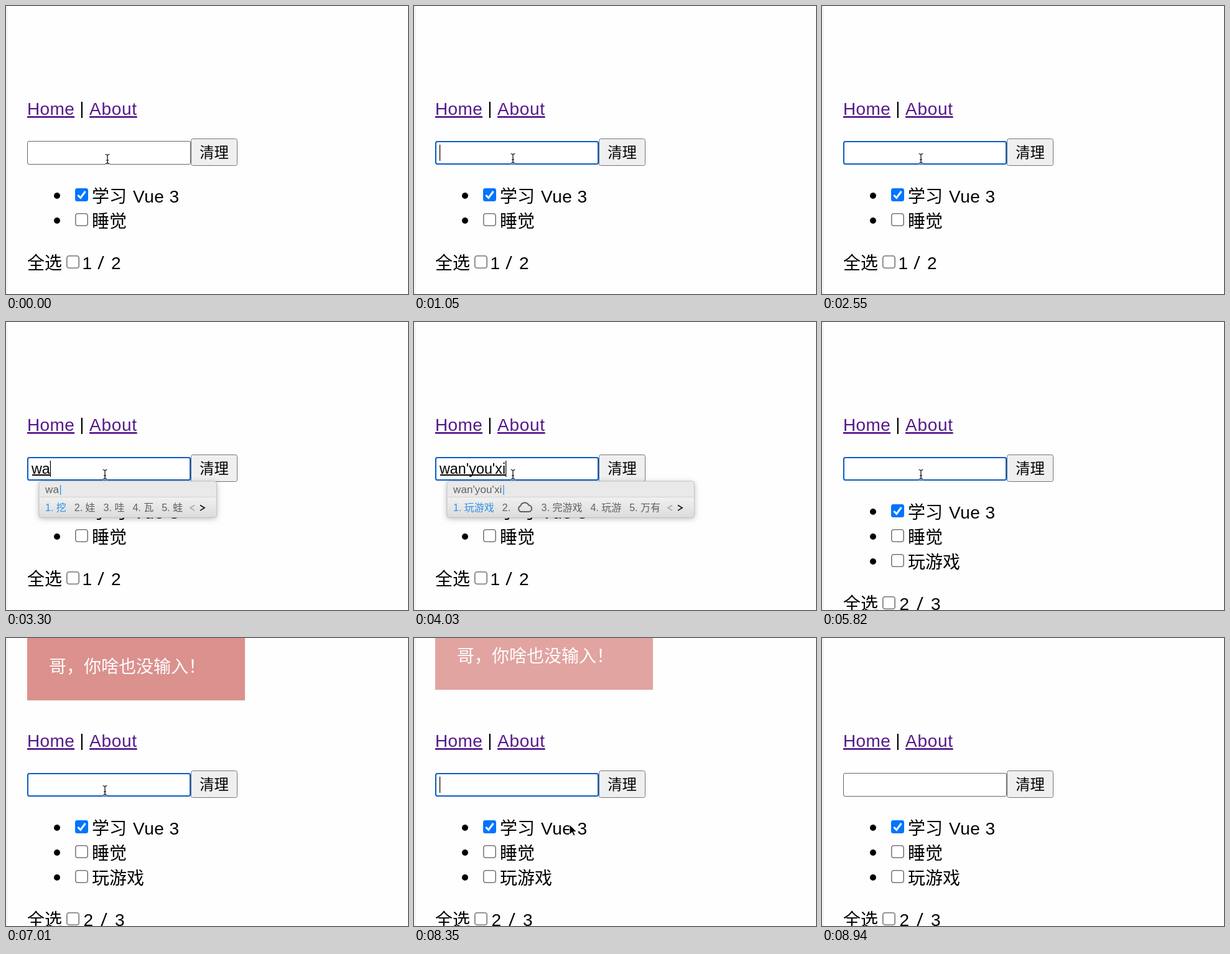
Recreate the animation shown at these times as an HTML page. Size 646 px wide and 463 px high, loop 9.04 s.

```html
<!DOCTYPE html>
<html lang="zh-CN">
<head>
<meta charset="utf-8">
<style>
html, body { margin: 0; width: 100%; height: 100%; overflow: hidden; background: #fefefe; }
svg { display: block; font: 28px "Liberation Sans", "Noto Sans CJK SC", "Noto Sans CJK", sans-serif; white-space: pre; }
.link { fill: #551a8b; text-decoration: underline 1.6px; text-underline-offset: 2.5px; }
.slash { font: 30px "Open Sans", sans-serif; }
.field { font-size: 23.33px; }
.ime { font-size: 16px; fill: #606060; }
.pop { filter: drop-shadow(0 2px 5px rgba(0, 0, 0, .27)); }
</style>
</head>
<body>
<svg id="stage" width="646" height="463" viewBox="0 0 646 463"></svg>
<script>
const LOOP = 9040;
// the screen only refreshes at these moments
const TICKS = [0, 450, 600, 1050, 1500, 1950, 2550, 3000, 3300, 3450, 3740, 3890, 4030, 4180,
  4480, 4630, 4770, 4920, 5220, 5820, 6260, 6710, 6860, 7010, 7160, 7310, 7750, 7900,
  8200, 8350, 8500, 8640, 8790, 8940];
const CARET = [[1050, 1500], [1950, 2550], [3000, 4920], [5220, 5820], [6260, 6710], [7310, 7750], [8200, 8790]];
const POINTER = [[0, 163, 246], [450, 161, 246], [600, 159, 245], [7750, 161, 247], [7900, 164, 250],
  [8200, 166, 254], [8350, 250, 300], [8500, 450, 385], [8640, 619, 444]];
const TYPING = [
  [3300, "wa", "挖 娃 哇 瓦 蛙"],
  [3450, "wan", "玩 完 万 晚 弯"],
  [3740, "wan'y", "玩呀 万一 晚有 完 玩"],
  [3890, "wan'you", "玩游 万有 玩有 万友 完"],
  [4030, "wan'you'xi", "玩游戏 ☁ 完游戏 玩游 万有"],
  [4180, "玩游戏", ""],
  [4480, "", ""]];
const FOCUS = 1050, ADD = 4480, BLUR = 8790;

const stage = document.getElementById("stage");
const ctx = document.createElement("canvas").getContext("2d");

const last = (list, t) => list.filter(e => e[0] <= t).pop();
const text = (x, y, s, attrs = "") => `<text x="${x}" y="${y}" ${attrs}>${s}</text>`;
const rect = (x, y, w, h, attrs = "") => `<rect x="${x}" y="${y}" width="${w}" height="${h}" ${attrs}/>`;

function width(s, size) {
  ctx.font = `${size}px "Liberation Sans", "Noto Sans CJK SC", "Noto Sans CJK", sans-serif`;
  return ctx.measureText(s).width;
}

// CSS "ease" over 300 ms
function ease(ms) {
  const p = Math.min(1, Math.max(0, ms / 300));
  const bez = (a, b, u) => 3 * a * u * (1 - u) ** 2 + 3 * b * u * u * (1 - u) + u ** 3;
  let lo = 0, hi = 1;
  for (let i = 0; i < 24; i++) {
    const mid = (lo + hi) / 2;
    if (bez(.25, .25, mid) < p) lo = mid; else hi = mid;
  }
  return bez(.1, 1, lo);
}

function box(x, y, on) {
  return on
    ? rect(x, y, 21, 21, 'rx="3.5" fill="#0075ff"') +
      `<path d="M${x + 4.5} ${y + 11}l4.3 4.5 7.7-10.5" fill="none" stroke="#fff" stroke-width="3"/>`
    : rect(x + .8, y + .8, 19.4, 19.4, 'rx="3.5" fill="#fff" stroke="#767676" stroke-width="1.6"');
}

function item(i, label, done) {
  const y = 40 * i;
  return `<circle cx="82" cy="${305 + y}" r="5"/>` + box(111, 293 + y, done) + text(138, 316 + y, label);
}

function footer(y, done, all, x) {
  return text(34, 423 + y, "全选") + box(97, 401 + y) + text(x[0], 423 + y, done) +
    text(x[1], 423 + y, "/", 'class="slash"') + text(x[2], 423 + y, all);
}

function popup(typed, words) {
  let x = 63, out = "";
  words.split(" ").forEach((w, i) => {
    const cloud = w === "☁";
    out += text(x, 304, `${i + 1}. ${cloud ? "" : w}`, i ? "" : 'fill="#2f8fea"');
    if (cloud) out += `<path d="M${x + 30} 305a5 5 0 0 1-.5-9.5a7 7 0 0 1 13-1a5.3 5.3 0 0 1 .5 10.5z" fill="none" stroke="#606060" stroke-width="2"/>`;
    x += 30.8 + 16 * (cloud ? 2 : w.length);
  });
  const arrow = (ax, dx, color) =>
    `<path d="M${ax} 294.5l${dx} 4.3l${-dx} 4.3" fill="none" stroke="${color}" stroke-width="1.7"/>`;
  const w = x - 11.5, cx = 65 + width(typed, 17) + typed.length * .1;
  return `<g class="ime"><g class="pop">` + rect(53, 256, w, 58, 'rx="4" fill="#e9e9e9"') + "</g>" +
    rect(53, 282, w, 32, 'rx="4" fill="url(#bar)"') + rect(53, 281, w, 1, 'fill="#d4d4d4"') +
    rect(53, 256, w, 58.5, 'rx="4" fill="none" stroke="#bbb" stroke-width=".8"') +
    text(63, 275, typed, 'font-size="17" letter-spacing=".1"') + rect(cx, 262, 1.3, 16, 'fill="#2f8fea"') +
    out + arrow(x + 6, -7, "#aaa") + arrow(x + 15, 7, "#111") + "</g>";
}

function modal(t) {
  const k = t < 8300 ? ease(t - 6800) : 1 - ease(t - 8300);
  if (!k) return "";
  return `<g opacity="${k}" transform="translate(0 ${-105 * (1 - k)})">` +
    rect(34, -1, 350, 107.5, 'fill="#d98b88"') + text(69, 62.5, "哥，你啥也没输入！", 'fill="#fff"') + "</g>";
}

function pointer(t) {
  if (t >= BLUR) return "";
  const [, x, y] = last(POINTER, t);
  if (t >= 8350) return `<path transform="translate(${x} ${y})" d="M0 0v16l4-3.5 2.5 5.5 2.5-1-2.5-5.5h5z" stroke="#fff"/>`;
  const d = "M-3.5-7.5q3.5 0 3.5 2.5q0-2.5 3.5-2.5M0-5V5M-3.5 7.5q3.5 0 3.5-2.5q0 2.5 3.5 2.5M-2 2h4";
  return `<g transform="translate(${x} ${y})" fill="none"><path d="${d}" stroke="#fff" stroke-width="3"/><path d="${d}" stroke="#000" stroke-width="1.2"/></g>`;
}

function input(t, typed, words) {
  const focused = t >= FOCUS && t < BLUR, w = width(typed, 23.33);
  let out = focused
    ? rect(35, 218, 261, 36, 'rx="2.5" fill="#fff" stroke="#0c5cbe" stroke-width="2"')
    : rect(34.5, 217.5, 262, 37, 'rx="2.5" fill="#fff" stroke="#666"');
  out += text(41, 243.5, typed, 'class="field"');
  if (words) out += rect(42, 245, w - 1, 2);
  if (CARET.some(([a, b]) => t >= a && t < b)) out += rect(41 + w, 223, 1.2, 26);
  return out;
}

function draw(t) {
  const [, typed, words] = last(TYPING, t) || [0, "", ""];
  const added = t >= ADD, k = ease(t - ADD + 60);
  stage.innerHTML =
    '<linearGradient id="bar" x2="0" y2="1"><stop stop-color="#f0f0f0"/><stop offset="1" stop-color="#dcdcdc"/></linearGradient>' +
    rect(0, 0, 3, 463, 'fill="#f5f5f5"') +
    text(34, 175, "Home", 'class="link" letter-spacing=".35"') +
    text(122, 173.5, "|", 'text-anchor="middle"') +
    text(134, 175, "About", 'class="link" letter-spacing=".7"') +
    input(t, typed, words) +
    rect(297.5, 213.5, 74, 43, 'rx="3" fill="#efefef" stroke="#767676"') +
    text(334.5, 244, "清理", 'class="field" text-anchor="middle"') +
    item(0, "学习", true) + text(204, 316, "Vue 3", 'letter-spacing=".5"') +
    item(1, "睡觉") +
    (added ? `<g opacity="${k}" transform="translate(${52.5 * (1 - k)} 0)">${item(2, "玩游戏")}</g>` : "") +
    (added ? footer(40, 2, 3, [124.5, 152, 175]) : footer(0, 1, 2, [122.5, 147, 169])) +
    (words ? popup(typed, words) : "") + modal(t) + pointer(t);
}

let shown = -1;
function frame() {
  const now = performance.now() % LOOP;
  const t = TICKS.filter(v => v <= now).pop();
  if (t !== shown) draw(shown = t);
  requestAnimationFrame(frame);
}
frame();
</script>
</body>
</html>
```
